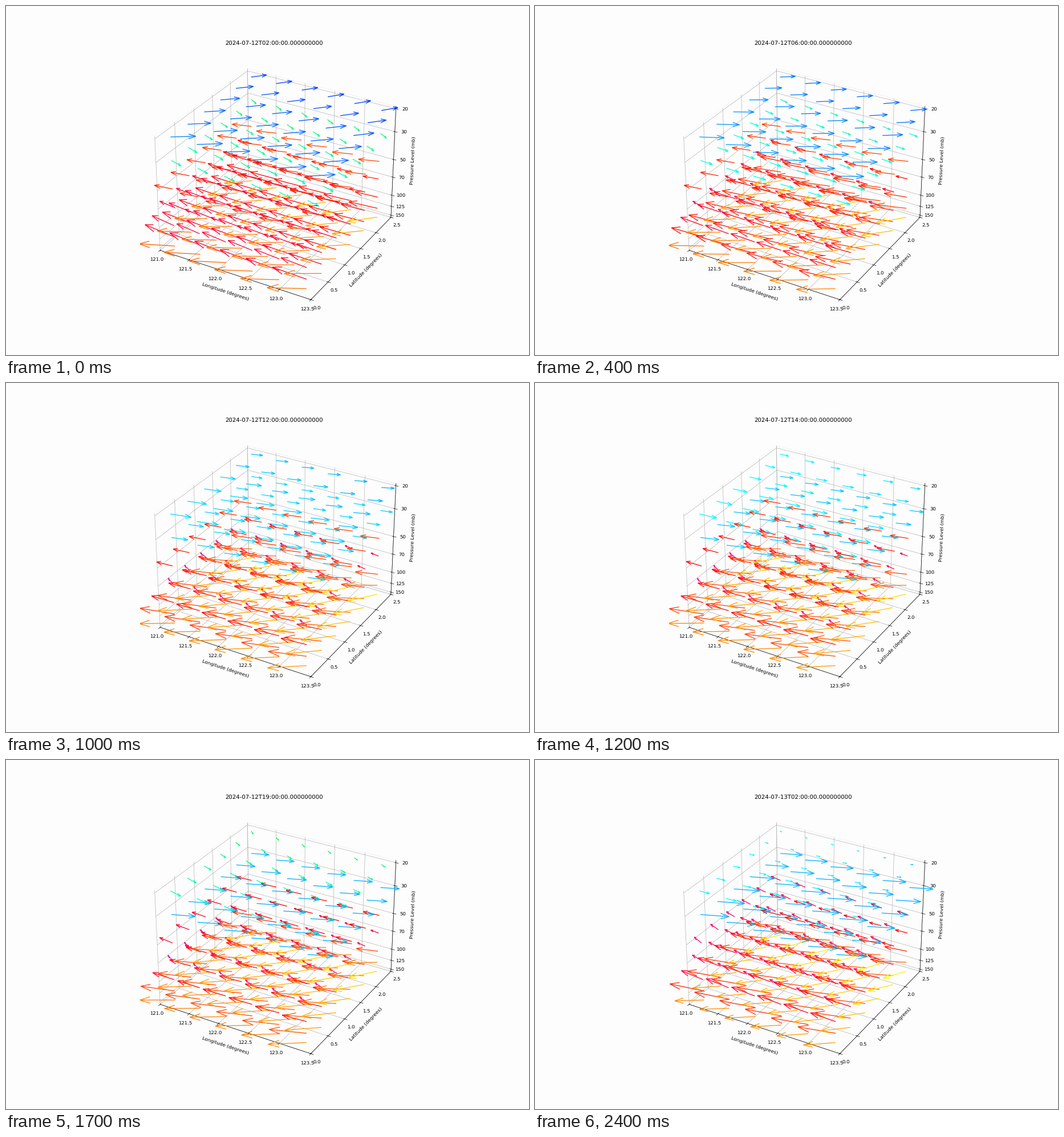
Write a matplotlib script that moves like this. It is 917 px wide and 611 px high and loops after 2.5 s.

```python
import matplotlib.pyplot as plt
import numpy as np
from matplotlib.animation import FuncAnimation

DPI = 61.1
W, H = 917, 611
FRAMES = 25
TOP, BOTTOM = 20, 150
DEPTH = 1.3

# Mean wind on each pressure level every 8 hours: east + north * 1j, in degrees
WINDS = {
    20: [0.23 + 0.20j, 0.27 + 0.11j, 0.15 - 0.06j, 0.10 + 0.01j],
    30: [0.17 - 0.07j, 0.18 + 0.03j, 0.28 + 0.11j, 0.35 + 0.14j],
    50: [-0.29 - 0.07j, -0.27 - 0.06j, -0.26, -0.19 + 0.06j],
    70: [-0.25, -0.15 + 0.06j, -0.14 + 0.06j, -0.21 + 0.03j],
    100: [-0.40 + 0.02j, -0.36 - 0.06j, -0.34 - 0.05j, -0.38],
    125: [-0.51 + 0.01j, -0.48 - 0.17j, -0.44 - 0.20j, -0.48 - 0.14j],
    150: [-0.41 - 0.27j, -0.36 - 0.34j, -0.38 - 0.32j, -0.28 - 0.29j],
}
KEY_HOURS = np.arange(0, 25, 8)


def height(p):
    """Relative height of a pressure level: 0 at the bottom, 1 at the top."""
    s = np.log(p / TOP) / np.log(BOTTOM / TOP)
    return 1 - s - 0.046 * s * (1 - s)


# Grid of arrow tails: level, latitude, longitude
levels = np.array(list(WINDS))
side = np.linspace(-1, 1, 6)
h, y, x = np.meshgrid(height(levels), side, side, indexing="ij")
lon = 122.25 + 1.09375 * x
lat = 1.25 + 1.09375 * y

# Wind change across the grid, which varies with height
shear = (x * (0.033 * h - 0.022) * 1j
         + y * (0.075 * (1 - h)**4 - 0.065 * h**3 + (0.03 * h - 0.038) * 1j))

plt.rcParams["text.hinting"] = "none"
fig = plt.figure(figsize=((W + 1e-6) / DPI, (H + 1e-6) / DPI), dpi=DPI,
                 facecolor="#fdfdfd")
ax = fig.add_subplot(projection="3d", facecolor="#fdfdfd")
for axis in (ax.xaxis, ax.yaxis, ax.zaxis):
    axis.pane.set_fill(False)

ax.set_xlim(121, 123.5)
ax.set_ylim(0, 2.5)
ax.set_zlim(-DEPTH / 48, DEPTH * 49 / 48)
ax.set_xticks(np.arange(121, 123.6, 0.5))
ax.set_yticks(np.arange(0, 2.6, 0.5))
ax.set_zticks(DEPTH * height(levels), [str(p) for p in levels])
ax.set_xlabel("Longitude (degrees)")
ax.set_ylabel("Latitude (degrees)")
ax.set_zlabel("Pressure Level (mb)")
title = ax.set_title("")
arrows = None


def draw(i):
    global arrows
    if arrows is not None:
        arrows.remove()
    mean = np.array([np.interp(i, KEY_HOURS, keys) for keys in WINDS.values()])
    wind = mean[:, None, None] + shear
    hue = (np.angle(wind) + np.pi) / (2 * np.pi)
    arrows = ax.quiver(lon, lat, DEPTH * h, wind.real, wind.imag, 0 * h,
                       colors=plt.cm.hsv(hue.ravel()))
    day, hour = divmod(i + 2, 24)
    title.set_text(f"2024-07-{12 + day}T{hour:02d}:00:00.000000000")
    return arrows, title


anim = FuncAnimation(fig, draw, frames=FRAMES, interval=100,
                     repeat=True, repeat_delay=0, blit=False)
plt.show()
```
